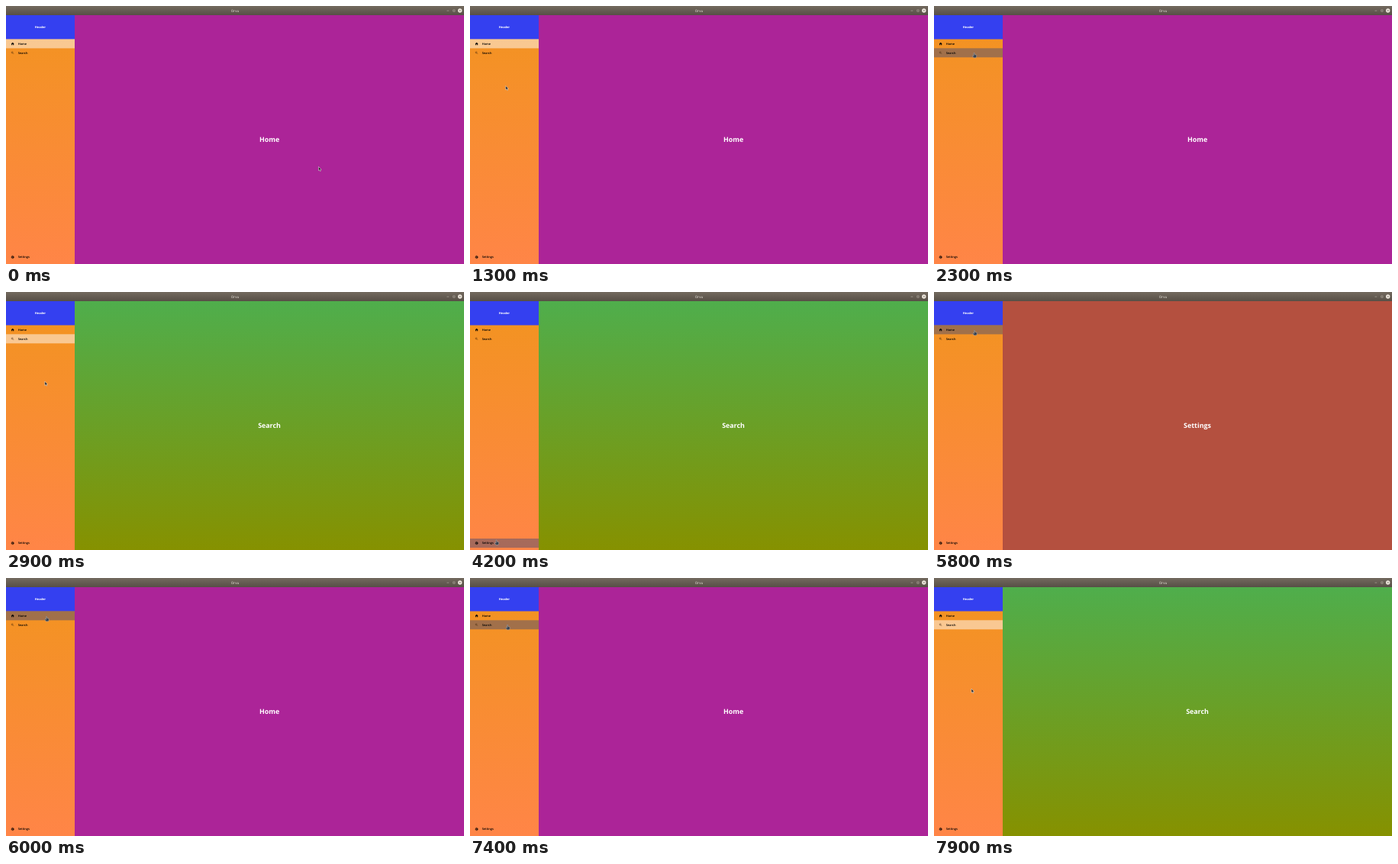
Recreate the animation shown at these times as an HTML page. Size 600x338 px, loop 8 s.

```html
<!DOCTYPE html>
<html lang="en">
<head>
<meta charset="utf-8">
<title>Orvu</title>
<style>
  html, body { margin: 0; width: 100%; height: 100%; overflow: hidden; }
  svg { display: block; width: 100vw; height: 100vh; }
  text { font: 600 3.95px "Open Sans", "Noto Sans", sans-serif; text-rendering: geometricPrecision; }
  .mid { text-anchor: middle; fill: #fff; }
  #label { font-size: 8.9px; font-weight: 700; }
  #title { font-size: 4.5px; font-weight: 400; fill: #f2ede5; }
</style>
</head>
<body>
<svg viewBox="0 0 600 338" preserveAspectRatio="none">
  <defs>
    <linearGradient id="bar" x2="0" y2="1">
      <stop stop-color="#736a5f"/><stop offset="1" stop-color="#574f46"/>
    </linearGradient>
    <linearGradient id="side" x2="0" y2="1">
      <stop stop-color="#f2941f"/><stop offset="1" stop-color="#ff8547"/>
    </linearGradient>
    <linearGradient id="green" x2="0" y2="1">
      <stop stop-color="#4fae4c"/><stop offset="1" stop-color="#869100"/>
    </linearGradient>
  </defs>

  <rect id="page" x="90" y="12" width="510" height="326"/>
  <text id="label" class="mid" x="345" y="178.2"></text>

  <rect y="12" width="90" height="326" fill="url(#side)"/>
  <rect y="12" width="90" height="31.5" fill="#3440f0"/>
  <text class="mid" x="45" y="29.4" style="font-weight:700">Header</text>

  <g id="rows"></g>
  <path transform="translate(8.7 49.4)" d="M-2 .2 0-1.7 2 .2H1.5V1.8H.5V.6H-.5V1.8H-1.5V.2Z"/>
  <g transform="translate(8.6 61.3)" fill="none" stroke="#4a2c10" stroke-width=".5">
    <circle cx="-.4" cy="-.4" r="1"/><path d="M.4 .4 1.6 1.6"/>
  </g>
  <g transform="translate(8.7 329)" fill="none" stroke="#000">
    <circle r="1.1"/>
    <circle r="1.8" stroke-width=".6" stroke-dasharray=".75"/>
  </g>

  <rect width="600" height="12" fill="url(#bar)"/>
  <text id="title" class="mid" x="300" y="7.6">Orvu</text>
  <g fill="none" stroke="#b5ada2" stroke-width=".6">
    <path d="M577.5 6.2H580.3"/>
    <rect x="585.8" y="5" width="2.2" height="2.2"/>
    <circle cx="594.7" cy="6" r="2.7" fill="#f0e9df" stroke="none"/>
    <path d="M593.8 5.1 595.6 6.9M595.6 5.1 593.8 6.9" stroke="#6b6257"/>
  </g>

  <g id="cursor">
    <path id="arrow" d="M0 0V5.2L1.2 4.2 2 6 2.9 5.6 2.1 3.9 3.6 3.7Z" fill="#222" stroke="#eee" stroke-width=".5"/>
    <path id="hand" d="M-.4 0H.6V2L3.2 2.7V4.6L2.5 6.3H-.6L-2.2 3.7-1.5 3.1-.4 4Z" fill="#34404f" stroke="#b5b0ae" stroke-width=".5"/>
  </g>
</svg>
<script>
const $ = id => document.getElementById(id);
const LOOP = 8000, STEP = 100, ROW_H = 12;
const rowTop = { Home: 43.4, Search: 55.3, Settings: 323 };
const fills = { Home: '#ac2498', Search: 'url(#green)', Settings: '#b4503f' };
const clicks = [[0, 'Home'], [2600, 'Search'], [4300, 'Settings'], [6000, 'Home'], [7700, 'Search']];

// pointer moves; "via" bends the way there
const origin = [409.5, 210.5];
const moves = [
  { from: 0, to: 700, end: [172, 307], via: [-200, 130] },
  { from: 800, to: 1100, end: [46, 110] },
  { from: 1200, to: 2100, end: [52.5, 61.5] },
  { from: 2500, to: 3100, end: [50, 145] },
  { from: 3300, to: 4200, end: [34.5, 325] },
  { from: 4300, to: 4800, end: [52, 96] },
  { from: 5000, to: 5800, end: [53, 50.5] },
  { from: 6000, to: 6500, end: [50, 145] },
  { from: 6600, to: 7400, end: [49, 61.5] },
  { from: 7600, to: 7900, end: [49, 145] }
];

const rows = {};
for (const [name, y] of Object.entries(rowTop)) {
  $('rows').insertAdjacentHTML('beforeend',
    `<rect y="${y}" width="90" height="${ROW_H}"/><text x="15.7" y="${y + 7.4}">${name}</text>`);
  rows[name] = $('rows').querySelector('rect:last-of-type');
}

function pointer(t) {
  let pos = origin;
  for (const { from, to, end, via } of moves) {
    if (t < from) break;
    const k = Math.min(1, (t - from) / (to - from));
    pos = pos.map((a, i) => {
      const mid = via ? via[i] : (a + end[i]) / 2;
      return (1 - k) ** 2 * a + 2 * k * (1 - k) * mid + k * k * end[i];
    });
  }
  return pos;
}

function draw(t) {
  const page = clicks.filter(c => c[0] <= t).pop()[1];
  const [x, y] = pointer(t);
  const hover = Object.keys(rowTop).find(n => x < 90 && y >= rowTop[n] && y < rowTop[n] + ROW_H);

  $('page').setAttribute('fill', fills[page]);
  $('label').textContent = page;
  for (const name in rows) {
    const lit = name === (hover || page);
    rows[name].setAttribute('fill', hover ? '#505070' : '#fff');
    rows[name].setAttribute('fill-opacity', lit ? .5 : 0);
  }
  $('cursor').setAttribute('transform', `translate(${x} ${y})`);
  $('arrow').style.display = hover ? 'none' : '';
  $('hand').style.display = hover ? '' : 'none';
}

const start = performance.now();
function tick() {
  const t = (performance.now() - start) % LOOP;
  draw(Math.floor(t / STEP) * STEP);
  requestAnimationFrame(tick);
}
tick();
</script>
</body>
</html>
```
